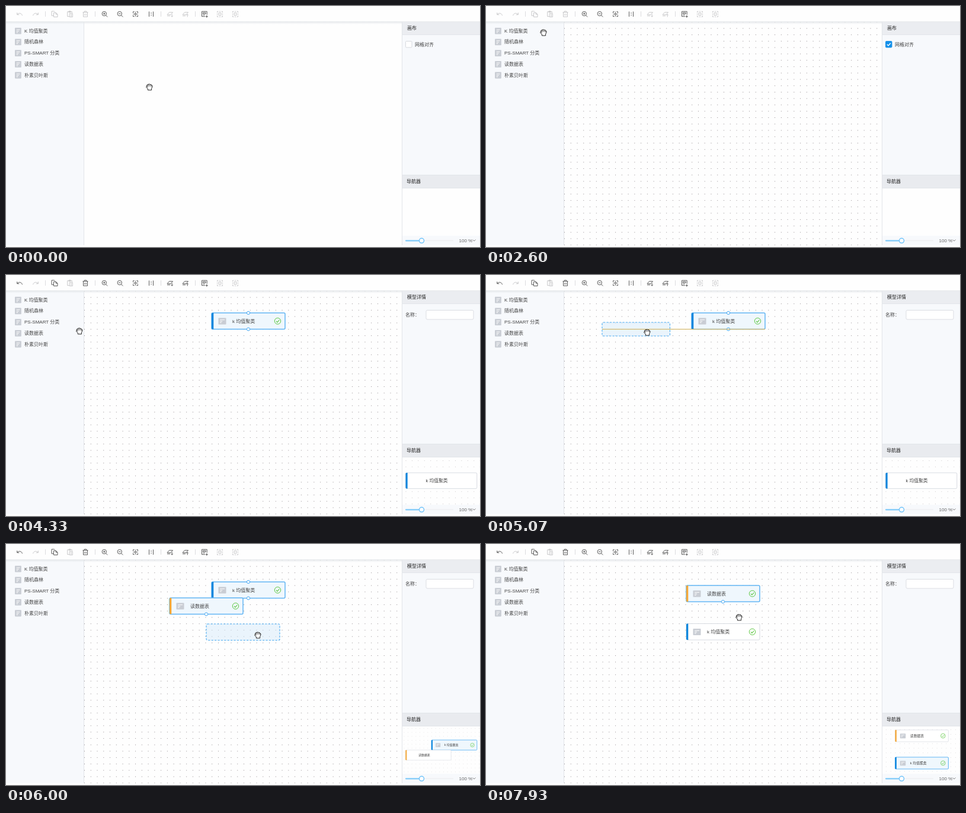
An HTML page that plays this animation: 800x407 px, repeating every 8000 ms.

```html
<!DOCTYPE html>
<html lang="zh">
<head>
<meta charset="utf-8">
<title>流程画布</title>
<style>
  html, body { margin: 0; width: 100%; height: 100%; overflow: hidden; background: #fefefe; }
  svg { display: block; width: 100vw; height: 100vh; }
  text { font: 8px "Liberation Sans", "Noto Sans CJK SC", "Noto Sans CJK", sans-serif; fill: #444; white-space: pre; }
  .title { font-weight: 500; fill: #222; }
  .icon { fill: none; stroke: #4a4a4a; stroke-width: .9; }
  .off { stroke: #c3c3c6; }
  .body { fill: #fff; stroke: #cdd2da; stroke-width: .8; }
  .sel > .body { fill: #eff7fd; stroke: #62b5f4; stroke-width: 1.5; }
  .port { fill: #fff; stroke: #45a7f2; stroke-width: 1; display: none; }
  .sel > .port { display: inline; }
  #nav .port, .fresh > .detail { display: none; }
  .cursor { fill: #fff; stroke: #222; stroke-width: 1; stroke-linejoin: round; stroke-linecap: round; }
</style>
</head>
<body>
<svg id="stage" viewBox="0 0 800 407" preserveAspectRatio="none"></svg>
<script>
const LOOP = 8000, STEP = 200 / 3;
const T = { check: 1930, grabK: 2900, dropK: 3930, grabD: 4600, dropD: 5390,
            moveK: 5730, putK: 6060, moveD: 6250, putD: 6660 };

// ---------- markup helpers ----------
const rect = (x, y, w, h, attrs = '') => `<rect x="${x}" y="${y}" width="${w}" height="${h}" ${attrs}/>`;
const text = (x, y, s, attrs = '') => `<text x="${x}" y="${y}" ${attrs}>${s}</text>`;
const path = (d, attrs = '') => `<path d="${d}" ${attrs}/>`;
const group = (id, content, attrs = '') => `<g id="${id}" ${attrs}>${content}</g>`;

const layers = 'M-5 1 -1.5-3H4.5L1 1ZM-5 3H0';
const cluster = 'M-4.5-2.5V-4.5H-2.5M2.5-4.5H4.5V-2.5M4.5 2.5V4.5H2.5M-2.5 4.5H-4.5V2.5M-1-4.5H1M-1 4.5H1M-4.5-1V1M4.5-1V1M-2-2H2V2H-2Z';
const lens = 'M3-.7A3.7 3.7 0 1 1-4.4-.7A3.7 3.7 0 1 1 3-.7M2 2 4.8 4.8M-2.5-.7H1.1';
// [x, shape, behaviour]: "edit" icons wake up once a node exists
const tools = [
  [23, 'M-4.3-2.5V1H-.8M-4 .6C-1.5-2.4 3-2.2 4.5 2.5', 'edit'],
  [50, 'M4.3-2.5V1H.8M4 .6C1.5-2.4-3-2.2-4.5 2.5', 'off'],
  [82, 'M-1.5 2.5H-5V-4.8H-.5L1-3.3M-1.5-2.2H2.5L5 .2V4.8H-1.5ZM2.3-2V.4H5', 'edit'],
  [108, 'M-1 4H-4.3V-4H3.4V-2M-2-5H1V-3H-2ZM-.8-1H4.3V4.8H-.8ZM1 1H3M1 3H3', 'off'],
  [134, 'M-4.5-3H4.5M-1.8-3V-4.8H1.8V-3M-3.5-3V4.5H3.5V-3M-1.2-.5V2.3M1.2-.5V2.3', 'edit'],
  [166.5, lens + 'M-.7-2.5V1.1'],
  [192.5, lens],
  [218.5, 'M-4-1.8V-4H-1.8M1.8-4H4V-1.8M4 1.8V4H1.8M-1.8 4H-4V1.8M-1.3-1.3H1.3V1.3H-1.3ZM-4 0H-2.6M2.6 0H4M0-4V-2.6M0 2.6V4'],
  [245, 'M-3.5-4.3V4.3M3.5-4.3V4.3M0-2.6V-.9M0 .9V2.6'],
  [277, layers + 'M3.2 0V4.5M1.6 3 3.2 4.6 4.8 3', 'edit'],
  [303, layers + 'M3.2 4.8V.3M1.6 1.8 3.2.2 4.8 1.8', 'edit'],
  [335, 'M4.2 1V-4.5H-4.5V4H1M-2.5-2.5H2V-.5H-2.5ZM-2.5 1.5H.5M3.8 2V6M1.8 4H5.8'],
  [361, cluster, 'off'],
  [387, cluster, 'off']
];

const listIcon = (x, y, w, h) => rect(x, y, w, h, 'rx=".8" fill="#c9cdd4"') +
  path(`M${x + 2.6} ${y + 3.2}h${w - 5}M${x + 2.6} ${y + 5.7}h4M${x + 2.6} ${y + 8}h2.5`, 'stroke="#fff" stroke-width="1"');

const node = (id, label, color, ports) => group(id,
  rect(0, 0, 124, 27.5, 'class="body" rx="2"') +
  path('M3.3 0H1.8Q0 0 0 1.8V25.7Q0 27.5 1.8 27.5H3.3Z', `fill="${color}"`) +
  `<g class="detail">${listIcon(11.5, 8.5, 13, 11)}
    <circle cx="111.5" cy="13.8" r="5.2" fill="none" stroke="#58c63c"/>
    ${path('M108.9 13.9 110.9 15.9 114.3 12', 'fill="none" stroke="#58c63c" stroke-width="1.1"')}</g>` +
  text(35, 16.7, label) +
  ports.map(y => `<circle class="port" cx="62" cy="${y}" r="2.6"/>`).join(''));

const nodePair = p => node(p + 'K', 'k 均值聚类', '#0d86dd', [0, 27.5]) +
                      node(p + 'D', '读数据表', '#f4a737', [27.5]);

const dots = id => `<pattern id="${id}" width="10.76" height="10.76" patternUnits="userSpaceOnUse">
  ${rect(0, 0, 1, 1, 'fill="#8c8589"')}</pattern>`;

const cursors = {
  fist: path('M-4.5-1.5Q-5-4-3-4Q-2.5-5.5-1-4.7Q.3-5.8 1.5-4.5Q3.5-5 3.8-3Q5.4-3 5-.8L3.6 2.5V5H-2.6V3L-5.2.3Q-5.4-1.3-4.5-1.5Z') +
        path('M-2.8-3.6V-1.2M-.7-4.3V-1.6M1.6-4V-1.6M3.7-2.8V-1.2M-4.5-1.5-3 .5', 'fill="none" stroke-width=".8"'),
  palm: path('M-2.6 5V3.2L-5 .2Q-5.4-1.4-3.6-.8L-2.6.2-3.7-3.4Q-3.5-5-2.2-4.2L-1.3-2V-4.8Q-.4-6.4.6-4.9V-2L1.3-4.4Q2.4-5.6 3.1-4.1L2.9-1.4 3.8-2.7Q5.3-3.2 5-1.4L3.6 3V5Z') +
        path('M-1.3-2V-.8M.8-2V-.8M2.8-1.4V-.6', 'fill="none" stroke-width=".7"'),
  point: path('M-1.4 5V3.4L-4.2.5Q-4.4-1-3-.7L-1.9.3V-4.4Q-.9-5.8 0-4.4V-1.4Q1.2-2 1.9-1Q3-1.4 3.5-.4Q4.8-.4 4.8.8L3.7 3.4V5Z') +
         path('M.2 1V3M1.9 1V3', 'fill="none" stroke-width=".7"'),
  arrow: path('M-3-5V4L-.9 2 .6 5.3 2.2 4.6.7 1.5H3.5Z', 'style="fill:#111;stroke:#fff;stroke-width:.8"'),
  move: path('M0-5.5 2.2-3H.8V-.8H3V-2.2L5.5 0 3 2.2V.8H.8V3H2.2L0 5.5-2.2 3H-.8V.8H-3V2.2L-5.5 0-3-2.2V-.8H-.8V-3H-2.2Z',
             'style="fill:#111;stroke:#fff;stroke-width:.6"')
};

const sideItems = ['K 均值聚类', '随机森林', 'PS-SMART 分类', '读数据表', '朴素贝叶斯'];
const hairline = 'stroke="#e2e5ea" stroke-width="1"';

document.getElementById('stage').innerHTML = `
  <defs>${dots('grid')}${dots('navGrid')}
    <linearGradient id="shade" x2="0" y2="1"><stop stop-color="#e4e7ea"/><stop offset="1" stop-color="#e4e7ea" stop-opacity="0"/></linearGradient>
    <clipPath id="navClip">${rect(668.5, 307, 131.5, 81)}</clipPath></defs>
  ${rect(0, 0, 800, 407, 'fill="#fefefe"')}
  ${rect(0, 27, 132, 377, 'fill="#f7f9fc"')}
  ${rect(668, 27, 132, 377, 'fill="#f7f9fc"')}
  ${rect(132, 27, 536, 377, 'id="gridArea" fill="url(#grid)"')}
  ${path('M131.5 27V404M668.5 27V404', hairline)}
  ${rect(0, 26, 800, 5, 'fill="url(#shade)"')}
  ${rect(669, 27, 131, 21, 'fill="#ebedf1"')}
  ${rect(669, 286, 131, 21, 'fill="#e9ebef"')}
  ${path('M669 48.5H800M669 285.5H800M669 307.5H800', hairline)}
  ${rect(669, 308, 131, 80, 'fill="#fefefe"')}
  ${tools.map(([x, d, kind = '']) => path(d, `class="icon ${kind}" transform="translate(${x} 13.7)"`)).join('')}
  ${path('M66.5 9V18M150.5 9V18M261.5 9V18M319.5 9V18', 'stroke="#dcdcdf"')}
  ${sideItems.map((s, i) => listIcon(15, 36.8 + i * 18.7, 10.8, 10.8) + text(31, 44.7 + i * 18.7, s)).join('')}
  ${group('canvasPanel', text(677, 39.7, '画布', 'class="title"') +
    rect(674.5, 59.5, 10.5, 10.5, 'id="box" rx="1.2"') +
    path('M676.8 64.8 679 67 682.8 62.7', 'id="tick" fill="none" stroke="#fff" stroke-width="1.4"') +
    text(690, 67.8, '网格对齐'))}
  ${group('modelPanel', text(677, 39.7, '模型详情', 'class="title"') + text(674, 70, '名称：') +
    rect(709, 59.5, 80, 15.5, 'rx="2" fill="#fff" stroke="#d7dae0" stroke-width=".9"'))}
  ${text(676, 298.8, '导航器', 'class="title"')}
  ${path('M675 396.3H755', 'stroke="#f0f2f4" stroke-width="2"')}
  ${path('M675 396.3H698', 'stroke="#80cbfa" stroke-width="2.2" stroke-linecap="round"')}
  <circle cx="701.5" cy="396.3" r="4" fill="#fff" stroke="#72c4fa" stroke-width="1.5"/>
  ${text(764.5, 398.6, '100 %', 'style="fill:#666"')}
  ${path('M787.5 394.5 790 397 792.5 394.5', 'fill="none" stroke="#777" stroke-width=".9"')}
  <g clip-path="url(#navClip)">${group('nav', rect(669, 308, 131, 80, 'fill="url(#navGrid)" opacity=".5"') + nodePair('nav'))}</g>
  ${nodePair('main')}
  <rect id="ghost" rx="2" fill="#d8ecfc" fill-opacity=".5" stroke="#4dacf1" stroke-width="1.1" stroke-dasharray="3.4 2"/>
  <path id="snap" fill="none" stroke="#cfae55" stroke-width="1"/>
  <g id="cursor" class="cursor">${Object.entries(cursors).map(([k, s]) => group(k, s)).join('')}</g>`;

// ---------- motion ----------
const el = id => document.getElementById(id);
const show = (id, on) => { el(id).style.display = on ? 'inline' : 'none'; };
const place = (id, [x, y], scale = 1) => el(id).setAttribute('transform', `translate(${x} ${y}) scale(${scale})`);
const within = (t, a, b) => t >= a && t < b;

// [time, x, y] of the pointer
const track = [
  [0, 242, 137], [330, 242, 137], [1400, 702, 71], [1660, 704, 72.5], [2070, 704, 72.5],
  [2700, 53, 43], [T.grabK, 53, 43], [3530, 348, 81], [3800, 407, 78], [T.dropK, 407, 78],
  [4470, 70, 98], [T.grabD, 70, 98], [5070, 272, 97], [5300, 357, 110], [T.dropD, 357, 110],
  [5660, 434, 83], [T.moveK, 434, 83], [6000, 425, 154], [T.putK, 425, 154],
  [6200, 368, 102], [T.moveD, 368, 102], [6460, 429, 81], [T.putD, 429, 81],
  [7070, 429, 82], [7600, 427, 124], [LOOP, 427, 124]
];

function pointerAt(t) {
  const i = Math.max(1, track.findIndex(k => k[0] > t));
  const [t0, x0, y0] = track[i - 1], [t1, x1, y1] = track[i];
  const p = Math.min(1, (t - t0) / (t1 - t0)), e = p * p * (3 - 2 * p);
  return [x0 + (x1 - x0) * e, y0 + (y1 - y0) * e];
}

function pointerKind(t, x) {
  if (within(t, 1340, 2110)) return 'point';
  if (x > 668) return 'arrow';
  if (within(t, 3300, T.dropK) || within(t, 6380, 6800)) return 'palm';
  if (within(t, 5560, T.moveK)) return 'move';
  return 'fist';
}

// [start, end, width, height, left offset, top offset] relative to the pointer
const drags = [
  [T.grabK, T.dropK, 114.5, 23, -55.3, -11.3],
  [T.grabD, T.dropD, 114.5, 23, -76, -17],
  [T.moveK, T.putK, 124, 27.5, -87, -19],
  [T.moveD, T.putD, 124, 27.5, -91.5, -11.2]
];

// navigator layouts: [start, scale, K position, D position, K class, D class]
const layouts = [
  [T.dropK, .97, [674.5, 334], null, 'fresh', ''],
  [T.dropD, .62, [718, 331], [674.3, 348], 'sel', 'fresh'],
  [T.putK, .65, [715.5, 353], [675.5, 325], '', 'sel'],
  [T.putD, .725, [690.5, 360], [690.5, 314], 'sel', '']
];

function renderPointer(t) {
  const [x, y] = pointerAt(t), kind = pointerKind(t, x);
  place('cursor', [x, y]);
  Object.keys(cursors).forEach(k => show(k, k === kind));

  const drag = drags.find(d => within(t, d[0], d[1]));
  show('ghost', drag);
  if (drag) {
    const [, , width, height, dx, dy] = drag;
    Object.entries({ x: x + dx, y: y + dy, width, height }).forEach(([k, v]) => el('ghost').setAttribute(k, v));
  }
  const level = within(t, 5040, 5110), upright = within(t, 6430, T.putD);
  show('snap', level || upright);
  el('snap').setAttribute('d', level ? `M${x - 76} 91.5H471` : 'M400 70V162M462 70V162');
}

function renderNodes(t) {
  const hasK = t >= T.dropK, hasD = t >= T.dropD;
  show('mainK', hasK);
  show('mainD', hasD);
  place('mainK', t < T.putK ? [347, 64] : [338, 134.5]);
  place('mainD', t < T.putD ? [276, 91] : [338, 70]);
  el('mainK').classList.toggle('sel', t < T.dropD || within(t, 5560, T.putD));
  el('mainD').classList.toggle('sel', t < T.putK || t >= T.putD);

  show('nav', hasK);
  show('navD', hasD);
  const layout = layouts.filter(l => t >= l[0]).pop();
  if (!layout) return;
  const [, scale, k, d, kClass, dClass] = layout;
  place('navK', k, scale);
  if (d) place('navD', d, scale);
  el('navK').setAttribute('class', kClass);
  el('navD').setAttribute('class', dClass);
  el('navGrid').setAttribute('patternTransform', `translate(${k[0]} ${k[1]}) scale(${scale})`);
}

function renderPanels(t) {
  const checked = t >= T.check, hasK = t >= T.dropK, hover = within(t, 1340, 2110);
  show('gridArea', checked);
  show('tick', checked);
  show('canvasPanel', !hasK);
  show('modelPanel', hasK);
  el('box').setAttribute('fill', checked ? '#118fe9' : '#fff');
  el('box').setAttribute('stroke', checked || hover ? '#2597ea' : '#d6d9de');
  document.querySelectorAll('.edit').forEach(n => n.classList.toggle('off', !hasK));
}

el('grid').setAttribute('patternTransform', 'translate(132 26.6)');

function frame(now) {
  const t = Math.floor((now % LOOP + 4) / STEP) * STEP % LOOP;
  renderPanels(t);
  renderNodes(t);
  renderPointer(t);
  requestAnimationFrame(frame);
}
frame(performance.now());
</script>
</body>
</html>
```
